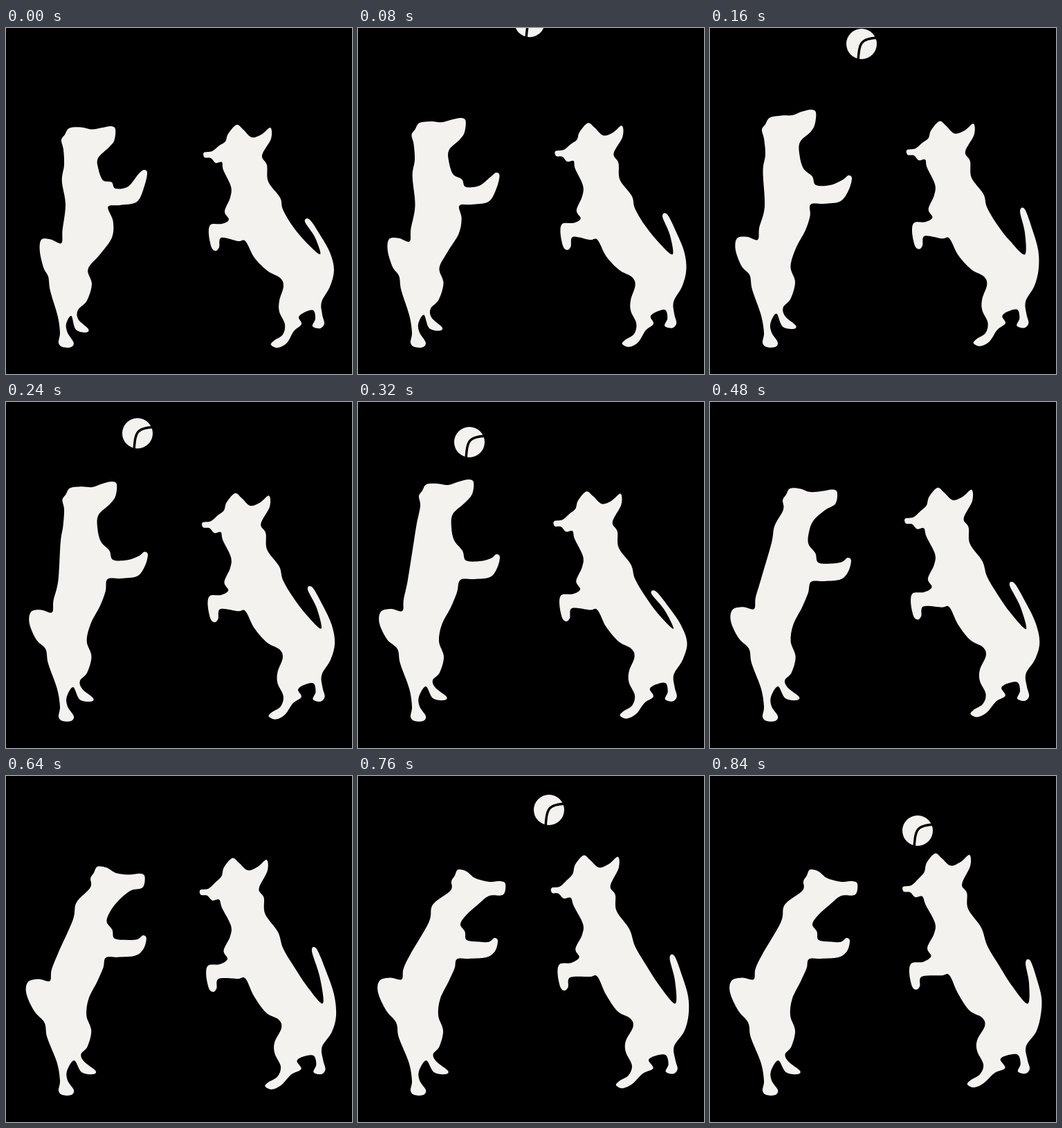
Write an HTML page with a canvas that moves like this. It is 500 px wide and 500 px high and loops after 4800 ms.

```html
<!DOCTYPE html>
<html>
<head>
<meta charset="utf-8">
<style>
html, body { margin: 0; height: 100%; overflow: hidden; background: #000; }
canvas { display: block; width: 100vw; height: 100vh; }
</style>
</head>
<body>
<canvas id="stage" width="500" height="500"></canvas>
<script>
const LOOP = 4800, STEP = 40, END = 840;
const LIGHT = '#f3f2ee', DARK = '#000';
const ctx = document.getElementById('stage').getContext('2d');

// A dog is one outline, bent by pins. Each pin lists its x,y at every time;
// the outline is drawn in the pose of the time with index `rest`.
const leftDog = {
  times: [0, 160, 320, 760],
  rest: 2,
  outline: [
    88,136, 93,128, 99,119, 115,118, 130,120, 146,115, 160,112, 167,116, 165,133,
    154,146, 137,162, 135,181, 139,200, 151,215, 156,229, 176,230, 192,226, 200,220,
    205,224, 201,240, 191,253, 168,256, 148,257, 143,275, 134,297, 121,322, 117,346,
    124,368, 118,391, 108,402, 112,413, 128,426, 124,431, 108,428, 98,411, 88,426,
    89,440, 98,454, 94,461, 82,461, 76,455, 78,440, 74,414, 61,378, 57,357, 42,343,
    31,320, 33,303, 48,299, 64,302, 66,285, 72,257, 81,200, 85,175, 90,150],
  pins: {
    ear: [80,162, 75,147, 88,136, 135,152],
    nose: [158,146, 153,122, 167,116, 213,156],
    jaw: [133,188, 130,165, 137,162, 172,187],
    throat: [140,220, 135,203, 139,200, 148,214],
    nape: [84,198, 80,183, 85,175, 108,186],
    back: [86,255, 79,258, 72,257, 76,257],
    armpit: [158,232, 153,227, 156,229, 157,237],
    paw: [199,205, 200,213, 200,220, 197,234],
    elbow: [165,256, 165,254, 168,256, 160,264],
    belly: [153,303, 138,292, 134,297, 131,297],
    haunch: [51,313, 39,311, 33,310, 31,303],
    hip: [80,311, 69,306, 64,302, 63,294],
    thigh: [124,370, 123,367, 124,368, 123,368],
    knee: [64,380, 61,378, 61,378, 59,378],
    nearFoot: [119,435, 124,430, 128,426, 130,426],
    farFoot: [82,450, 82,450, 82,450, 82,450]
  }
};
const rightDog = {
  times: [0, END],
  rest: 0,
  outline: [
    474,350, 468,374, 456,396, 457,414, 460,427, 454,434, 443,431, 447,420, 444,408,
    431,411, 423,418, 427,428, 416,438, 406,455, 393,462, 383,458, 387,452, 400,443,
    403,428, 395,410, 395,394, 401,373, 396,361, 378,351, 359,332, 346,308, 335,308,
    311,303, 308,317, 303,322, 297,317, 293,297, 296,284, 312,283, 322,277, 316,265,
    324,245, 325,229, 314,205, 312,194, 303,195, 296,188, 287,187, 286,180, 298,178,
    308,170, 317,164, 321,153, 333,140, 343,147, 355,158, 369,154, 382,144, 383,160,
    370,184, 377,198, 379,222, 396,245, 400,262, 414,286, 433,309, 454,327],
  pins: {
    crown: [333,140, 325,112],
    ear: [382,144, 375,114],
    nose: [286,183, 279,163],
    chest: [325,229, 325,212],
    withers: [379,222, 373,192],
    back: [414,286, 416,271],
    paw: [300,305, 295,292],
    belly: [346,308, 346,288],
    flank: [396,361, 393,349],
    knee: [395,394, 386,382],
    rump: [474,350, 478,345],
    tailRoot: [454,327, 459,329],
    nearFoot: [454,434, 456,430],
    farFoot: [383,458, 372,446]
  }
};
const tailTip = { times: [0, 160, 320, 640, END], path: [435,279, 451,264, 427,276, 445,252, 459,269] };

const lerp = (a, b, u) => a + (b - a) * u;

// Point on a piecewise linear path at time t.
function at(times, path, t) {
  const next = Math.max(1, times.findIndex(k => k >= t));
  const u = (t - times[next - 1]) / (times[next] - times[next - 1]);
  return [0, 1].map(j => lerp(path[2 * next - 2 + j], path[2 * next + j], Math.min(1, u)));
}

// Outline points, each shifted by the pins, near pins counting most.
function pose({ times, rest, outline, pins }, t) {
  const pulls = Object.values(pins).map(path => {
    const x = path[2 * rest], y = path[2 * rest + 1];
    const [px, py] = at(times, path, t);
    return { x, y, dx: px - x, dy: py - y };
  });
  const points = [];
  for (let i = 0; i < outline.length; i += 2) {
    const [x, y] = [outline[i], outline[i + 1]];
    let sum = 0, dx = 0, dy = 0;
    for (const p of pulls) {
      const w = ((x - p.x) ** 2 + (y - p.y) ** 2 + 1) ** -1.7;
      sum += w;
      dx += w * p.dx;
      dy += w * p.dy;
    }
    points.push([x + dx / sum, y + dy / sum]);
  }
  return points;
}

// Tapered tail from the root over the tip to the rump, its sides bowed outwards.
function tail(root, rump, t) {
  const tip = at(tailTip.times, tailTip.path, t);
  const side = (a, b, u, bow) => {
    const dx = b[0] - a[0], dy = b[1] - a[1], len = Math.hypot(dx, dy);
    return [a[0] + dx * u + dy / len * bow, a[1] + dy * u - dx / len * bow];
  };
  return [
    side(root, tip, .5, -2),
    [tip[0] - 3, tip[1] + 1],
    [tip[0] + 4, tip[1] - 2],
    side(tip, rump, .35, 7),
    side(tip, rump, .7, 7)];
}

// Tossed in from the right, bumped up by the left dog, dropping to the right dog.
function ballAt(t) {
  if (t <= 320) {
    const u = t / 160;
    return [277 - 58 * u, -50 + 92 * u - 19 * u * u];
  }
  if (t < 600) {
    const u = (t - 320) / 160;
    return [161 + 48 * u, 58 - 108 * u];
  }
  const u = (t - 760) / 80;
  return [276 + 24 * u, 49 + 39.5 * u - 9.5 * u * u];
}

// Fills a closed Catmull-Rom curve through the points.
function blob(points) {
  const n = points.length, p = i => points[(i + n) % n];
  const handle = (i, s) => [0, 1].map(j => p(i)[j] + s * (p(i + 1)[j] - p(i - 1)[j]) / 6);
  ctx.beginPath();
  ctx.moveTo(...p(0));
  for (let i = 0; i < n; i++) ctx.bezierCurveTo(...handle(i, 1), ...handle(i + 1, -1), ...p(i + 1));
  ctx.fill();
}

function drawBall(x, y) {
  ctx.save();
  ctx.translate(x, y);
  ctx.beginPath();
  ctx.arc(0, 0, 22, 0, 7);
  ctx.fill();
  ctx.beginPath();
  ctx.moveTo(-5, 24);
  ctx.bezierCurveTo(-3, 0, -3, -8, 24, -9);
  ctx.strokeStyle = DARK;
  ctx.lineWidth = 3.5;
  ctx.stroke();
  ctx.restore();
}

function draw() {
  const now = performance.now() % LOOP;
  const t = Math.min(END, Math.floor(now / STEP) * STEP);
  ctx.fillStyle = DARK;
  ctx.fillRect(0, 0, 500, 500);
  ctx.fillStyle = LIGHT;
  blob(pose(leftDog, Math.min(t, 760)));
  const right = pose(rightDog, t);
  blob([...right, ...tail(right[right.length - 1], right[0], t)]);
  drawBall(...ballAt(t));
  requestAnimationFrame(draw);
}
draw();
</script>
</body>
</html>
```
